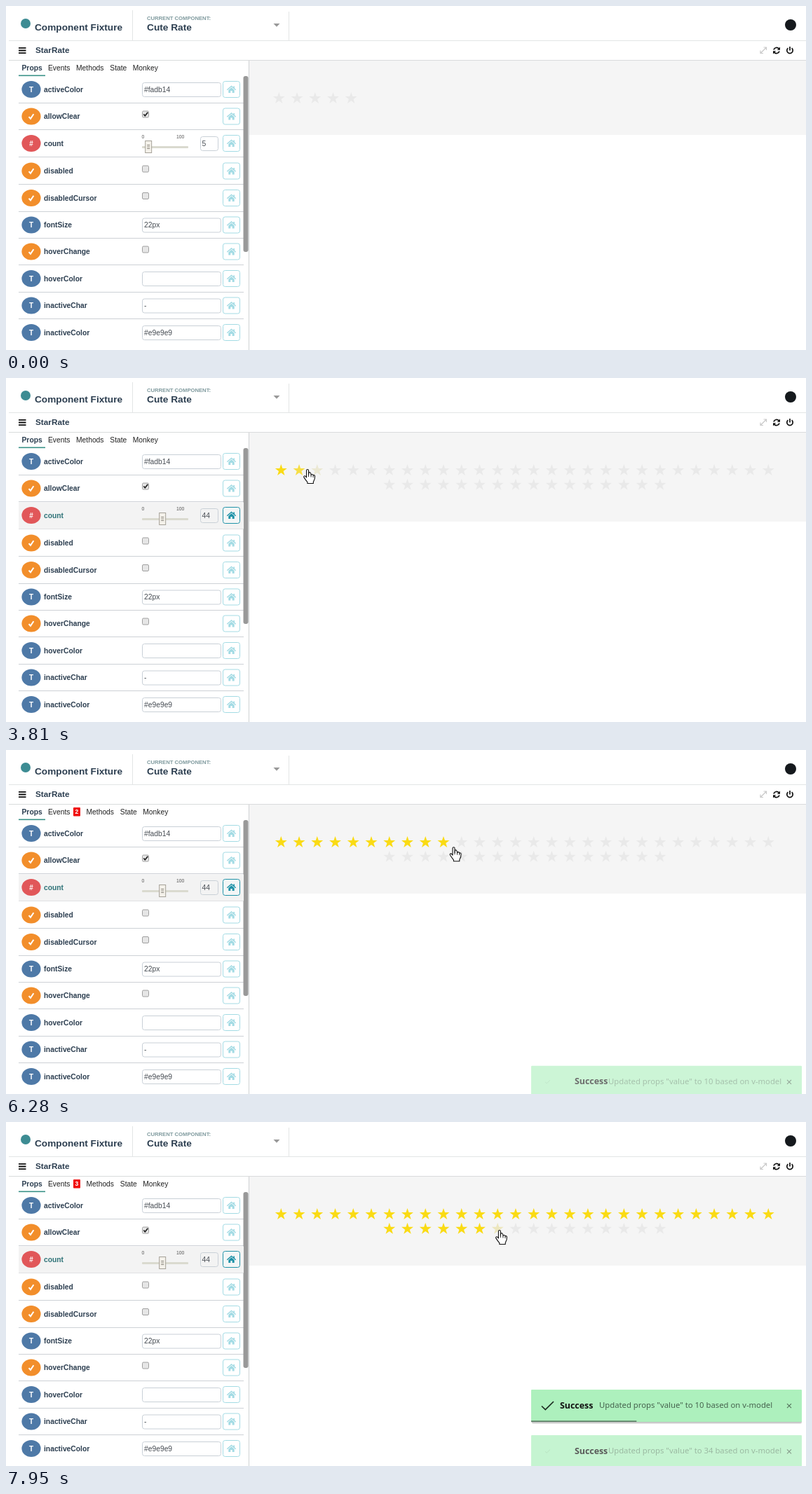
These frames come from a looping animation (1141 by 491 pixels, 8 s). An HTML page:

```html
<!DOCTYPE html>
<html lang="en">
<head>
<meta charset="utf-8">
<title>Component Fixture</title>
<style>
html, body { margin: 0; width: 100%; height: 100%; overflow: hidden; background: #fff; }
svg { display: block; width: 1141px; height: 491px; }
text { font-family: "Liberation Sans", Arial, sans-serif; font-size: 10.3px; white-space: pre; }
.b { font-weight: bold; }
.toast text { font-family: "Noto Sans", "Open Sans", sans-serif; }
</style>
</head>
<body>
<svg viewBox="0 0 1141 491"><g id="base"></g><g id="live"></g></svg>
<script>
const LOOP = 8000, INK = '#2c3e50', STEP = 25.74, PER_ROW = 28;
const ROWS = [
  ['activeColor', 119, 'text', '#fadb14'],
  ['allowClear', 157.5, 'bool', true],
  ['count', 196, 'number'],
  ['disabled', 235.5, 'bool'],
  ['disabledCursor', 274, 'bool'],
  ['fontSize', 312.5, 'text', '22px'],
  ['hoverChange', 350.5, 'bool'],
  ['hoverColor', 389, 'text', ''],
  ['inactiveChar', 427.5, 'text', '-'],
  ['inactiveColor', 466, 'text', '#e9e9e9'],
];
const KIND = { text: ['#4e79a7', 'T'], bool: ['#f28e2b', ''], number: ['#e15759', '#'] };

// time, x, y of the pointer tip
const POINTER = [
  [300, 1041, 472], [500, 760, 370], [800, 350, 232], [1070, 224, 197], [1380, 212, 198], [1540, 208, 197],
  [1770, 208, 197], [2300, 228, 197], [2480, 228, 197], [2790, 224, 197], [2960, 224, 197], [3200, 300, 166],
  [3500, 388, 134], [3810, 430, 131], [4150, 480, 131], [4510, 517, 124], [4740, 515, 126], [5050, 515, 126],
  [5250, 545, 133], [5500, 592, 137], [5820, 628, 135], [6130, 628, 135], [6600, 661, 148], [7000, 667, 150],
  [7300, 674, 153], [7390, 676, 154], [7860, 677, 154], [7940, 704, 155],
];
const COUNT = [[1770, 5], [1850, 8], [2300, 48], [2480, 48], [2790, 44]];
const STAR_ON = [3480, 3580, 3780, 3940, 4120, 4300, 5200, 5400, 5520, 5640, 6400];
const CLICKS = [4740, 5960, 7600];
const TOASTS = [[6110, 10], [7750, 34]];

const clamp = v => Math.max(0, Math.min(1, v));

function track(keys, t) {
  if (t <= keys[0][0]) return keys[0].slice(1);
  for (let i = 1; i < keys.length; i++) {
    const a = keys[i - 1], b = keys[i];
    if (t < b[0]) return a.slice(1).map((v, k) => v + (b[k + 1] - v) * (t - a[0]) / (b[0] - a[0]));
  }
  return keys[keys.length - 1].slice(1);
}

const rect = (x, y, w, h, fill, more = '') => `<rect x="${x}" y="${y}" width="${w}" height="${h}" fill="${fill}" ${more}/>`;
const text = (x, y, s, fill = INK, size = 10.3, more = '') =>
  `<text x="${x}" y="${y}" fill="${fill}" style="font-size:${size}px" ${more}>${s}</text>`;
const bold = (x, y, s, fill, size, more = '') => text(x, y, s, fill, size, 'class="b" ' + more);
const line = (d, color, w = 1, more = '') => `<path d="${d}" fill="none" stroke="${color}" stroke-width="${w}" ${more}/>`;
const at = (x, y, body, more = '') => `<g transform="translate(${x} ${y})" ${more}>${body}</g>`;
const box = (x, y, w, h, fill, stroke, r = 3) => rect(x + .5, y + .5, w - 1, h - 1, fill, `rx="${r}" stroke="${stroke}"`);

function home(y, active) {
  const c = active ? '#2093a8' : '#a3dbe4';
  return box(309, y - 12, 25, 24, active ? '#f4f6f6' : '#fff', c) + at(321.5, y,
    line('M-6.2 .8L0-4.6L6.2 .8', c, 1.5) + `<path d="M-4.2 1L0-2.7L4.2 1V5H1.2V2H-1.2V5H-4.2ZM2.8-4.6H4.5V-1L2.8-2.5Z" fill="${c}"/>`);
}

function checkbox(y, on) {
  return box(194, y - 8, 10, 10, '#e6e6e6', '#a0a0a0', 1.5) +
    (on ? line(`M196.3 ${y - 3}l2 2.2l4-5`, '#222', 1.8) : '');
}

function row([name, y, kind, value], active, count) {
  const [color, mark] = KIND[kind];
  let s = active ? rect(18, y - 18.5, 321, 38, '#f3f3f3') : '';
  s += `<ellipse cx="36" cy="${y}" rx="13.6" ry="12" fill="${color}"/>`;
  s += mark ? bold(36, y + 3.6, mark, '#fff', 10, 'text-anchor="middle"') : line(`M32.6 ${y + .6}l2.4 2.8l4.4-6.6`, '#fff', 2);
  s += bold(54, y + 3.6, name, active ? '#2f7378' : INK) + home(y, active);
  if (kind === 'text') s += box(194, y - 10, 113, 21, '#fff', '#c9d0d7') + text(197, y + 3.8, value, '#454b52', 10.3);
  if (kind === 'bool') s += checkbox(y, value);
  if (kind === 'number') {
    const x = 200.6 + .513 * count;
    s += text(193.5, y - 7.5, '0', '#555', 6.8) + text(243, y - 7.5, '100', '#555', 6.8);
    s += rect(194, y + 4, 66, 3, '#dadacf', 'rx="1"');
    s += rect(x - 4.5, y - 3.5, 9, 17, '#f4f1ea', 'stroke="#a5a198"');
    s += line(`M${x - 2} ${y + 2.5}h4m-4 2.5h4m-4 2.5h4`, '#8a867d');
    s += box(277, y - 10, 26, 21, active ? '#f3f3f3' : '#fff', '#c9d0d7') + text(279.5, y + 3.8, Math.round(count), '#454b52');
  }
  return s;
}

function base() {
  let s = `<circle cx="28" cy="25" r="7" fill="#3d8c93"/><circle cx="1119" cy="27" r="8" fill="#15191d"/>`;
  s += bold(41, 35, 'Component Fixture', INK, 13.65) + bold(201, 35, 'Cute Rate', INK, 13.7);
  s += bold(201, 19.5, 'CURRENT COMPONENT:', '#7f9a9e', 7.67);
  s += '<path d="M381.5 25h9l-4.5 4.7z" fill="#999"/>';
  s += line('M4 49.5H1141M180.5 6V49M403.5 8V49', '#e3e5e6') + line('M4 77.5H1141', '#d9dbdc');
  s += line('M18 59.8h10.5M18 63.5h10.5M18 67.2h10.5', '#111', 1.8) + bold(42, 67.3, 'StarRate', INK, 11.8);
  s += line('M1076 67.5l8.5-8.5M1080.5 59h4v4M1076 63.5v4h4', '#c9c9c9', 1.2);
  s += at(1099, 63.5, line('M-4-1A4.2 4.2 0 0 1 3.3-2.6M4 1A4.2 4.2 0 0 1-3.3 2.6', '#111', 1.7) +
    '<path d="M5-5V-.8H.8ZM-5 5V.8H-.8Z" fill="#111"/>');
  s += at(1118, 63.5, line('M-2.6-3.4A4.2 4.2 0 1 0 2.6-3.4M0-5.5V0', '#111', 1.7));
  s += bold(22.5, 92, 'Props', INK) + text(60, 92, 'Events', '#222') + rect(18, 98.5, 38, 1.6, '#3a9288');
  for (const r of ROWS) {
    if (r[0] !== 'count') s += row(r, false);
    if (r[1] < 460) s += line(`M18 ${Math.floor(r[1] + 19) + .5}H339`, '#cdd1d6');
  }
  return s + line('M346.5 78V491', '#cfd2d4') + rect(338.5, 100, 7, 251, '#999', 'rx="3"');
}

function tabs(t) {
  const n = CLICKS.filter(c => t >= c).length, dx = n ? 14.5 : 0;
  return text(100 + dx, 92, 'Methods', '#222') + text(148.3 + dx, 92, 'State', '#222') + text(180.8 + dx, 92, 'Monkey', '#222') +
    (n ? rect(96, 82, 10, 12.5, '#f00e0e', 'rx="1"') + bold(101, 91.4, n, '#fff', 8.6, 'text-anchor="middle"') : '');
}

const STAR = 'M' + Array.from({ length: 10 }, (_, i) => {
  const a = i * Math.PI / 5, r = i % 2 ? 3.5 : 8.9;
  return (r * Math.sin(a)).toFixed(2) + ' ' + (-r * Math.cos(a)).toFixed(2);
}).join('L') + 'Z';

function starColor(i, t) {
  const on = STAR_ON[i] ?? (i < 34 ? 7340 : i < 35 ? 7890 : Infinity);
  const p = clamp((t - on) / 300);
  const mix = (a, b) => Math.round(a + (b - a) * p);
  return `rgb(${mix(233, 250)},${mix(233, 219)},${mix(233, 20)})`;
}

function stars(n, t) {
  const wrap = n > PER_ROW;
  let s = rect(347, 78, 794, wrap ? 127 : 106, '#f5f5f5');
  for (let i = 0; i < n; i++) {
    const r = Math.floor(i / PER_ROW), len = Math.min(PER_ROW, n - r * PER_ROW);
    const x0 = wrap ? 739.8 - (len - 1) * STEP / 2 : 389.3;
    s += `<path d="${STAR}" transform="translate(${x0 + i % PER_ROW * STEP} ${131.8 + 20.8 * r})" fill="${starColor(i, t)}"/>`;
  }
  return s;
}

function toast([start, value], t, lift) {
  if (t < start) return '';
  const age = t - start, e = 1 - (1 - clamp(age / 450)) ** 2;
  const u = 1 - clamp((age - 200) / 380), k = 1 - .6 * u;
  const body = rect(1, 3, 385, 46, '#000', 'opacity=".1" rx="2"') + rect(0, 1, 386, 46.5, '#000', 'opacity=".16" rx="2"') +
    rect(0, 0, 386, 46, '#adf0bd', 'rx="1"') +
    rect(0, 44.3, 385 * clamp(1 - age / 3020), 1.7, '#5e8067') +
    at(23.5, 23, `<g transform="scale(${k})">` + line('M-8.5 .5L-3.2 5.6L8.5-6', '#1c2a20', 1.7) + '</g>', `opacity="${1 - .8 * u}"`) +
    bold(41 + 21 * u, 26.5, 'Success', '#111', 12.4) +
    text(97 + 13 * u, 26, `Updated props "value" to ${value} based on v-model`, '#46634e', 11.3, `opacity="${1 - .4 * u}"`) +
    line('M365 20.2l6 6m0-6l-6 6', '#53705b', 1.1);
  return at(749, 433 - lift + 46 * (1 - e), body, `class="toast" opacity="${e}"`);
}

function pointer(t) {
  if (t < 300) return '';
  const [x, y] = track(POINTER, t);
  const hand = t > 3480 && t < 6520 || t > 7310;
  const d = hand
    ? 'M-1.6 1C-1.6-1 1.4-1 1.4 1V7C2-.0 5 5 5 7.6C5.6 5.8 8 6.2 8 8.2C9 7 10.6 7.8 10.4 9.6C10.6 14 9.5 15 8.2 17V19.5H-.2V17.6C-2 15.5-3.6 13.4-5.3 10.6C-6 9-4 8-2.8 9.4L-1.6 11Z'
    : 'M0 0V14.2L3.3 11.2L5.6 16.2L7.7 15.2L5.5 10.5H9.9Z';
  return at(x, y, `<path d="${d}" fill="#fff" stroke="#111" stroke-width="1.1" stroke-linejoin="round"/>` +
    (hand ? line('M1.4 6V10M4.9 7.5V10.5M8 8.5V11', '#111', .9) : ''));
}

const live = document.getElementById('live');
document.getElementById('base').innerHTML = base();

function draw() {
  const t = performance.now() % LOOP, count = track(COUNT, t)[0];
  live.innerHTML = stars(Math.round(count), t) + tabs(t) + row(ROWS[2], t >= 1770, count) +
    toast(TOASTS[0], t, t >= TOASTS[1][0] ? 51 : 0) + toast(TOASTS[1], t, 0) + pointer(t);
  requestAnimationFrame(draw);
}
draw();
</script>
</body>
</html>
```
